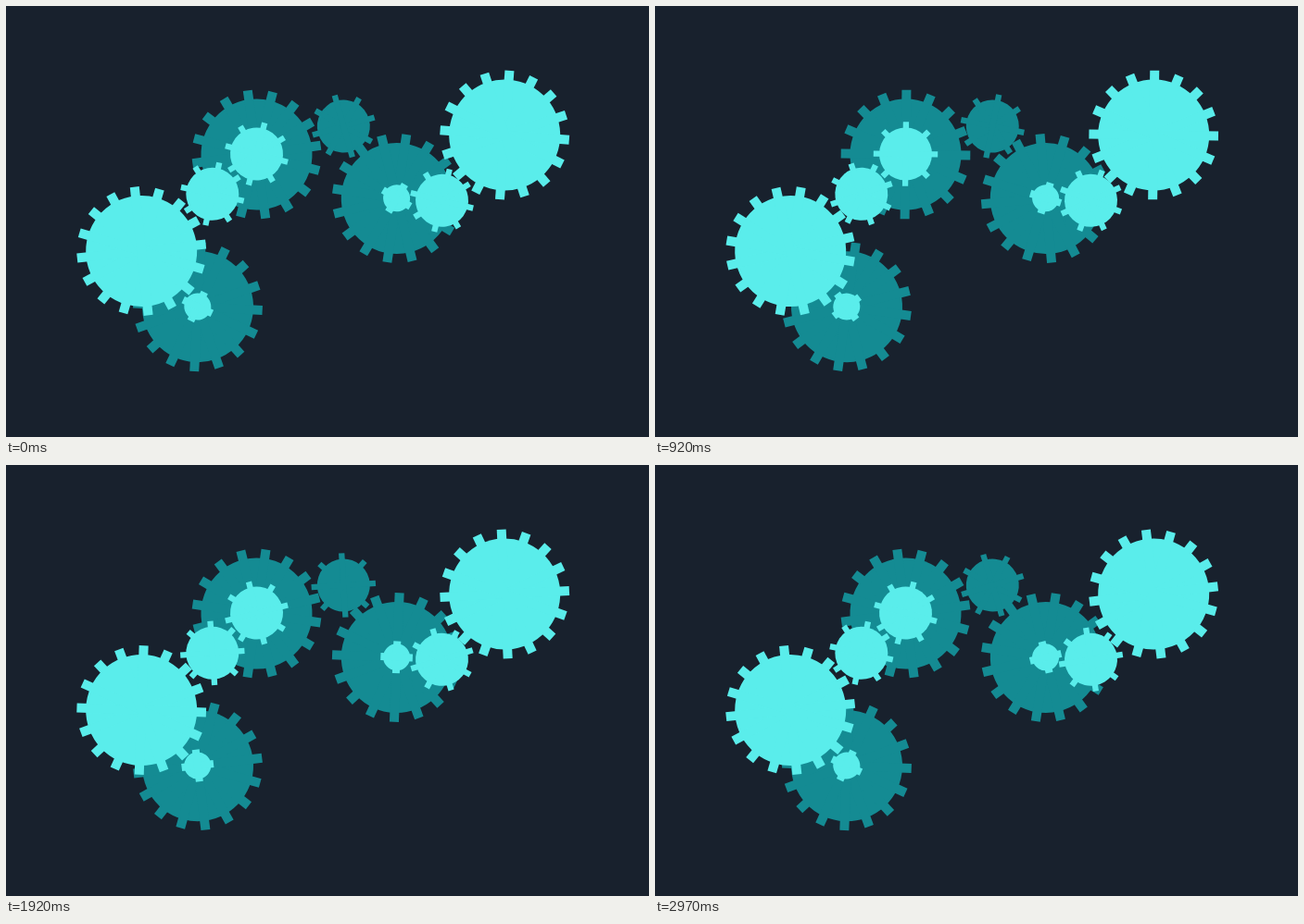
Write an HTML page with a canvas that moves like this. It is 694x466 px and loops after 3.11 s.

```html
<!DOCTYPE html>
<html lang="en">
<head>
<meta charset="utf-8">
<title>Gear train</title>
<style>
  html, body { margin: 0; width: 100%; height: 100%; overflow: hidden; background: #18212d; }
  canvas { display: block; width: 694px; height: 466px; }
</style>
</head>
<body>
<canvas id="stage" width="694" height="466"></canvas>
<script>
const ctx = document.getElementById('stage').getContext('2d');
const LOOP = 3110, STEP = 1000 / 12, LAST = 2970;
const BACK = '#18212d', DARK = '#148b93', LIGHT = '#5aedeb';

// body radius, tip radius, tooth width, tooth count
const BIG = { body: 60, tip: 69.8, width: 10, teeth: 16 };
const MID = { body: 28.5, tip: 34.7, width: 6.3, teeth: 8 };
const TINY = { body: 14.5, tip: 17.3, width: 8, teeth: 4 };

// start is in degrees clockwise from the top, speed in degrees per second
const gear = (kind, color, x, y, start, speed) => ({ kind, color, x, y, start, speed });
const gears = [
  gear(BIG, DARK, 207, 325.2, 3.1, 30),
  gear(BIG, DARK, 270.5, 160.5, 14.5, -15),
  gear(MID, DARK, 364.3, 130, 29, 30),
  gear(BIG, DARK, 421.8, 208, 8.6, -15),
  gear(BIG, LIGHT, 146.2, 265, 16.4, -7.5),
  gear(TINY, LIGHT, 206.8, 325, 25.6, 30),
  gear(MID, LIGHT, 270.5, 160, 14.5, -15),
  gear(MID, LIGHT, 222.8, 203.3, 12.4, 15),
  gear(TINY, LIGHT, 421.6, 207.8, 31.1, -15),
  gear(MID, LIGHT, 470.5, 210.3, 13.8, 7.5),
  gear(BIG, LIGHT, 538.2, 139.5, 4.3, -3.75)
];

function drawGear({ kind, color, x, y, start, speed }, seconds) {
  ctx.save();
  ctx.translate(x, y);
  ctx.rotate((start + speed * seconds) * Math.PI / 180);
  ctx.fillStyle = color;
  ctx.beginPath();
  ctx.arc(0, 0, kind.body, 0, Math.PI * 2);
  ctx.fill();
  // each bar forms two opposite teeth
  for (let i = 0; i < kind.teeth / 2; i++) {
    ctx.fillRect(-kind.width / 2, -kind.tip, kind.width, kind.tip * 2);
    ctx.rotate(Math.PI * 2 / kind.teeth);
  }
  ctx.restore();
}

// Twelve poses per second, with a longer hold on the last two
function poseTime(ms) {
  if (ms >= LAST) return LAST;
  return Math.min(34, Math.floor((ms + 4) / STEP)) * STEP;
}

function draw(now) {
  const seconds = poseTime(now % LOOP) / 1000;
  ctx.fillStyle = BACK;
  ctx.fillRect(0, 0, 694, 466);
  gears.forEach(g => drawGear(g, seconds));
}

const origin = performance.now();
function tick() {
  draw(performance.now() - origin);
  requestAnimationFrame(tick);
}
tick();
</script>
</body>
</html>
```
